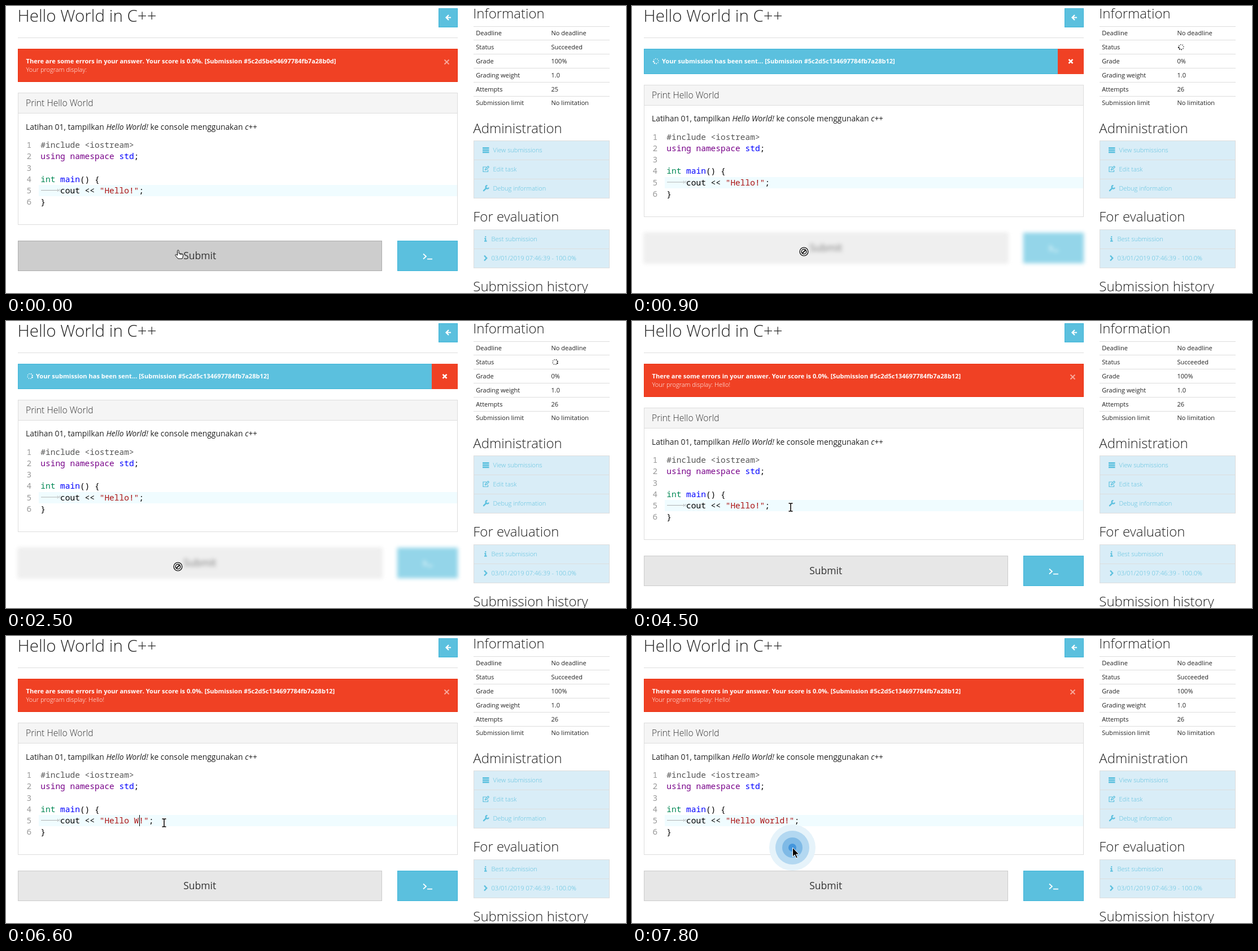
These frames come from a looping animation (1098 by 510 pixels, 8 s). An HTML page:

```html
<!DOCTYPE html>
<html lang="en">
<head>
<meta charset="utf-8">
<title>Hello World in C++</title>
<style>
html, body { margin: 0; width: 100%; height: 100%; overflow: hidden; background: #fff; }
svg { display: block; width: 1098px; height: 510px; }
text { font: 11.04px "Open Sans", sans-serif; fill: #222; white-space: pre; }
rect, .rule { shape-rendering: crispEdges; }
.rule { stroke: #ddd; fill: none; }
.h2 { font-size: 29.54px; font-weight: 300; }
.h3 { font-size: 24px; font-weight: 300; }
.panel-title { font-size: 15.7px; font-weight: 300; fill: #333; }
.task { font-size: 13.85px; }
.submit { font-size: 17.54px; fill: #333; }
.white { fill: #fff; }
.bold { font-weight: 700; }
.light { font-weight: 300; }
.link { font-size: 11.08px; fill: #5bc0de; font-weight: 300; }
.code { font: 14.5px "Noto Sans Mono", "DejaVu Sans Mono", monospace; fill: #000; }
.num { fill: #999; }
.meta { fill: #555; }
.key { fill: #708; }
.type { fill: #085; }
.def { fill: #00f; }
.str { fill: #a11; }
.box { fill: #d9edf7; stroke: #ddd; }
.info { fill: #5bc0de; stroke: #3db5d8; }
.icon { fill: none; stroke: #5bc0de; stroke-width: 1.6; }
.busy { filter: blur(3.7px); opacity: .65; }
</style>
</head>
<body>
<svg viewBox="0 0 1098 510">
  <defs>
    <g id="spinner"></g>
  </defs>

  <text class="h2" x="20.5" y="28">Hello World in C++</text>
  <rect class="info" x="766.5" y="4.5" width="33" height="33"/>
  <path d="M788 20.5h-8M784 16l-4.5 4.5l4.5 4.5" fill="none" stroke="#fff" stroke-width="2.2"/>
  <path class="rule" d="M21 56.5H800"/>

  <g id="errorAlert">
    <rect x="21.5" y="76.5" width="778" height="58" fill="#f04124" stroke="#ea2f10"/>
    <text class="white bold" id="errorTitle" x="35.5" y="102"></text>
    <text class="white light" id="errorBody" x="35.5" y="116.5"></text>
    <path d="M776.5 95.5l8 8m0-8l-8 8" stroke="#fff" stroke-width="1.8" opacity=".55"/>
  </g>

  <g id="infoAlert">
    <rect class="info" x="21.5" y="76.5" width="778" height="44"/>
    <g transform="translate(42.5 98)" fill="#fff"><use class="spin" href="#spinner"/></g>
    <g id="sent">
      <text class="white bold" x="53" y="102">Your submission has been sent... [Submission #5c2d5c134697784fb7a28b12]</text>
      <rect x="754" y="76" width="46" height="45" fill="#f04124"/>
      <path d="M773.5 94.8l7 7m0-7l-7 7" stroke="#fff" stroke-width="2.6"/>
    </g>
  </g>

  <g id="main">
    <rect x="21.5" y="154.5" width="778" height="234" fill="#fff" stroke="#ddd"/>
    <rect x="22" y="155" width="777" height="35" fill="#f5f5f5"/>
    <path class="rule" d="M22 190.5H799"/>
    <text class="panel-title" x="35" y="178">Print Hello World</text>
    <text class="task" x="35" y="219.5">Latihan 01, tampilkan <tspan font-style="italic">Hello World!</tspan> ke console menggunakan <tspan font-style="italic">c++</tspan></text>
    <rect x="58" y="318" width="741" height="20" fill="#f0fcff"/>
    <g id="code"></g>
    <path d="M62 327.5H93M91 325l2.5 2.5l-2.5 2.5M95.5 325v5" fill="none" stroke="#aaa" stroke-width=".9"/>
    <rect id="caret" y="318" width="1" height="20"/>
    <g id="buttons">
      <rect id="submit" x="21.5" y="417.5" width="644" height="53"/>
      <text class="submit" x="343.2" y="450" text-anchor="middle">Submit</text>
      <rect class="info" x="693.5" y="417.5" width="106" height="53"/>
      <path d="M739 440.5l5 4.5l-5 4.5M746 449.7h9" fill="none" stroke="#fff" stroke-width="1.7"/>
    </g>
  </g>

  <text class="h3" x="827.3" y="22">Information</text>
  <g id="facts"></g>
  <g id="statusSpinner" transform="translate(972.5 73)" fill="#222"><use class="spin" href="#spinner"/></g>

  <text class="h3" x="827.3" y="226">Administration</text>
  <rect class="box" x="828.5" y="239.5" width="240" height="102"/>
  <path class="rule" d="M829 273.5h240m-240 34h240"/>
  <path class="icon" style="stroke-width:2.8" d="M844 252.4h11.5m-11.5 3.7h11.5m-11.5 3.7h11.5"/>
  <path class="icon" style="stroke-width:1.2" d="M851 286h-6v8.5h8.5v-3.5M848.5 291.5l.4-2l4.8-4.8l1.6 1.6l-4.8 4.8z"/>
  <path class="icon" style="stroke-width:2.4;stroke-linecap:round" d="M846 328.2l4.8-4.8"/>
  <path class="icon" style="stroke-width:2.2" d="M852.5 319.2a2.7 2.7 0 1 0 2.4 3.4"/>
  <text class="link" x="862.5" y="260">View submissions</text>
  <text class="link" x="862.5" y="294">Edit task</text>
  <text class="link" x="862.5" y="328">Debug information</text>

  <text class="h3" x="827.3" y="383">For evaluation</text>
  <rect class="box" x="828.5" y="397.5" width="240" height="68"/>
  <path class="rule" d="M829 431.5h240"/>
  <path class="icon" d="M849.3 409v2.2M847.3 413.3h2v4.4m-2.3 0h4.6" style="stroke-width:1.9"/>
  <path class="icon" d="M847 443.5l4.2 4.5l-4.2 4.5" style="stroke-width:2.4"/>
  <text class="link" x="859.5" y="418">Best submission</text>
  <text class="link" x="859.5" y="452">03/01/2019 07:46:39 - 100.0%</text>
  <text class="h3" x="827.3" y="507">Submission history</text>

  <g class="cursor" id="hand" stroke="#000" fill="#fff" stroke-linejoin="round">
    <path d="M303.5 443v-7.5q0-1.7 1.3-1.7t1.3 1.7v4l5.8 1q1.8.4 1.8 2l-.7 4.2l-1 2.3h-7.3l-4.4-5.2q-1.2-1.6.1-2.1q1-.3 3.1 1.3z"/>
    <path d="M308.6 440v2.4m2.6-2v2.2"/>
  </g>
  <g class="cursor" id="blocked" fill="none">
    <circle cx="304.5" cy="436.5" r="8.6" fill="#fff"/>
    <circle cx="304.5" cy="436.5" r="7.4" stroke="#111" stroke-width="1.4"/>
    <circle cx="304.5" cy="436.5" r="4.3" stroke="#111" stroke-width="1.5"/>
    <path d="M301.5 439.5l6-6" stroke="#111" stroke-width="2"/>
  </g>
  <g class="cursor" id="beam" fill="none">
    <path d="M-4-7h3l1 1l1-1h3M0-6v12M-4 7h3l1-1l1 1h3" stroke="#fff" stroke-width="3.4"/>
    <path d="M-3.5-7h2.5l1 1l1-1h2.5M0-6v12M-3.5 7h2.5l1-1l1 1h2.5" stroke="#000" stroke-width="1.5"/>
  </g>
  <g class="cursor" id="arrow">
    <g id="ripple"></g>
    <path d="M284.5 376v16.2l3.7-3.4l2.6 6l2.5-1.1l-2.6-5.8h5z" fill="#000" stroke="#fff"/>
  </g>
</svg>

<script>
const LOOP = 8000, SHIFT = -14.5, CODE_X = 61.3, CHAR = 8.7;
const $ = id => document.getElementById(id);
const show = (el, on) => { el.style.display = on ? "" : "none"; };
const text = (x, y, content, cls = "") => `<text class="${cls}" x="${x}" y="${y}">${content}</text>`;
const span = (cls, content) => `<tspan class="${cls}">${content}</tspan>`;

// Eight dots on a ring, growing towards the upper right
$("spinner").innerHTML = [.8, .8, .8, .8, .8, 1, 1.2, 1.4].map((r, i) => {
  const a = i * Math.PI / 4;
  return `<circle cx="${4.4 * Math.cos(a)}" cy="${4.4 * Math.sin(a)}" r="${r}"/>`;
}).join("");

const lines = [
  span("meta", "#include &lt;iostream&gt;"),
  `${span("key", "using namespace")} ${span("def", "std")};`,
  "",
  `${span("type", "int")} ${span("def", "main")}() {`,
  `    cout &lt;&lt; <tspan class="str" id="greeting"></tspan>;`,
  "}"
];
$("code").innerHTML = lines.map((line, i) => {
  const y = 252 + 20.25 * i;
  return text(36.5, y, i + 1, "code num") + text(CODE_X, y, line, "code");
}).join("");

const facts = [["Deadline", "No deadline"], ["Status", "Succeeded"], ["Grade", "100%"],
  ["Grading weight", "1.0"], ["Attempts", "25"], ["Submission limit", "No limitation"]];
$("facts").innerHTML = facts.map(([name, value], i) => {
  const y = 52.3 + 24.8 * i;
  return `<path class="rule" d="M828 ${Math.floor(36 + 24.8 * i) + .5}H1069"/>` +
    text(832.3, y, name) + `<text id="fact${i}" x="965.5" y="${y}">${value}</text>`;
}).join("");

$("ripple").innerHTML = [[41, "#e6f3fa"], [30, "#b3d8f1"], [18, "#7fbae6"], [7, "#4496dc"]]
  .map(([r, color]) => `<circle cx="284" cy="376" r="${r}" fill="${color}"/>`).join("");

const typing = [[0, ""], [6200, " "], [6600, " W"], [6800, " Wo"], [7000, " Wor"], [7100, " World"]];
const cursors = [[0, "hand"], [300, "blocked"], [4500, "beam"], [7800, "arrow"]];
const beamSpots = [[0, "281 331"], [4600, "280 332"], [7500, "284 335"]];
const at = (steps, t) => steps.filter(([start]) => start <= t).pop()[1];

function draw(t) {
  const loading = t >= 300 && t < 4500, sent = t >= 600, done = t >= 4500;

  show($("errorAlert"), !loading);
  show($("infoAlert"), loading);
  show($("sent"), sent);
  $("errorTitle").textContent = "There are some errors in your answer. Your score is 0.0%. [Submission #" +
    (done ? "5c2d5c134697784fb7a28b12]" : "5c2d5be04697784fb7a28b0d]");
  $("errorBody").textContent = "Your program display:" + (done ? " Hello!" : "");

  $("main").setAttribute("transform", `translate(0 ${loading ? SHIFT : 0})`);
  $("buttons").setAttribute("class", loading ? "busy" : "");
  $("submit").setAttribute("fill", t < 300 ? "#cdcdcd" : "#e7e7e7");
  $("submit").setAttribute("stroke", t < 300 ? "#adadad" : "#cbcbcb");

  show($("statusSpinner"), loading);
  $("fact1").textContent = loading ? "" : "Succeeded";
  $("fact2").textContent = loading ? "0%" : "100%";
  $("fact4").textContent = sent ? "26" : "25";
  const turn = t < 500 ? 0 : (Math.min(t, 2500) - 300) * .36;
  for (const el of document.querySelectorAll(".spin")) el.setAttribute("transform", `rotate(${turn})`);

  const typed = at(typing, t);
  $("greeting").textContent = `"Hello${typed}!"`;
  show($("caret"), t >= 5800 && t < 7500);
  $("caret").setAttribute("x", Math.round(CODE_X + CHAR * (18 + typed.length) + 1));

  const active = at(cursors, t);
  for (const el of document.querySelectorAll(".cursor")) show(el, el.id === active);
  $("beam").setAttribute("transform", `translate(${at(beamSpots, t)})`);
}

const origin = performance.now();
let last = -1;
function tick() {
  const t = Math.floor((performance.now() - origin) % LOOP / 100) * 100;
  if (t !== last) draw(last = t);
  requestAnimationFrame(tick);
}
tick();
</script>
</body>
</html>
```
